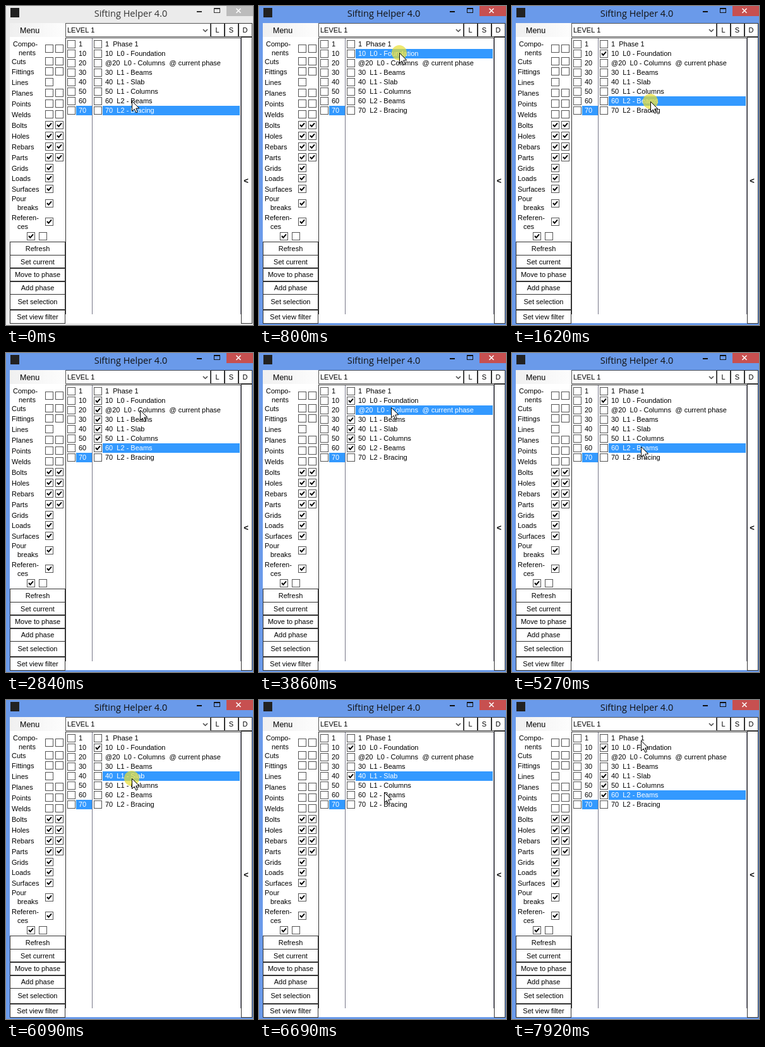
Write an HTML page with a canvas that moves like this. It is 391 px wide and 505 px high and loops after 8000 ms.

```html
<!DOCTYPE html>
<html lang="en">
<head>
<meta charset="utf-8">
<title>Sifting Helper 4.0</title>
<style>
html, body { margin: 0; width: 100%; height: 100%; overflow: hidden; background: #fff; }
canvas { display: block; }
</style>
</head>
<body>
<canvas id="stage" width="391" height="505"></canvas>
<script>
const ctx = document.getElementById('stage').getContext('2d');
const LOOP = 8000;
const UI = '11px "Liberation Sans", Arial, sans-serif';
const INK = '#000', LINE = '#333', SELECT = '#3399ff';

const phases = [
  ['1', '1  Phase 1'],
  ['10', '10  L0 - Foundation'],
  ['20', '@20  L0 - Columns', '@ current phase'],
  ['30', '30  L1 - Beams'],
  ['40', '40  L1 - Slab'],
  ['50', '50  L1 - Columns'],
  ['60', '60  L2 - Beams'],
  ['70', '70  L2 - Bracing']
];

// label, number of boxes, checked
const filters = [
  ['Cuts', 2, 0], ['Fittings', 2, 0], ['Lines', 1, 0], ['Planes', 2, 0],
  ['Points', 2, 0], ['Welds', 2, 0], ['Bolts', 2, 1], ['Holes', 2, 1],
  ['Rebars', 2, 1], ['Parts', 2, 1], ['Grids', 1, 1], ['Loads', 1, 1],
  ['Surfaces', 1, 1]
];

// label, top, height
const buttons = [
  ['Refresh', 373, 21], ['Set current', 394, 21], ['Move to phase', 414, 21],
  ['Add phase', 436, 20], ['Set selection', 456, 24], ['Set view filter', 481, 21]
];

// time, pointer x, pointer y, then any changes of state
const steps = [
  [0, 199, 150, { row: 7, on: '', active: false }],
  [200, 203, 133], [400, 211, 105], [600, 219, 80],
  [800, 222, 74, { row: 1, click: true, active: true }],
  [1000, 222, 74, { on: '1' }],
  [1200, 221, 112], [1400, 219, 158],
  [1620, 219, 151, { row: 6, click: true }],
  [1820, 219, 151, { on: '123456' }],
  [2440, 218, 138], [2640, 215, 112], [2840, 212, 90], [3040, 211, 77],
  [3660, 210, 89, { row: 2, click: true }],
  [3860, 209, 86, { on: '13456' }],
  [4250, 208, 118],
  [4450, 206, 144, { row: 6, click: true }],
  [4650, 205, 144, { on: '1' }],
  [5270, 204, 148], [5470, 204, 143], [5670, 202, 134], [5880, 200, 127],
  [6090, 199, 124, { row: 4, click: true }],
  [6280, 199, 124, { on: '14' }],
  [6500, 198, 146],
  [6700, 197, 157, { row: 6, click: true }],
  [6900, 197, 157, { on: '1456' }],
  [7500, 198, 145], [7700, 201, 104], [7920, 204, 64]
];

function stateAt(time) {
  const state = {};
  for (const [start, x, y, change] of steps) {
    if (start > time) break;
    Object.assign(state, { x, y, click: false }, change);
  }
  return state;
}

function fill(x, y, w, h, color) {
  ctx.fillStyle = color;
  ctx.fillRect(x, y, w, h);
}

function frame(x, y, w, h, color = LINE) {
  ctx.strokeStyle = color;
  ctx.lineWidth = 1;
  ctx.strokeRect(x + 0.5, y + 0.5, w - 1, h - 1);
}

function text(str, x, y, color = INK, font = UI, align = 'left') {
  ctx.font = font;
  ctx.textAlign = align;
  ctx.fillStyle = color;
  ctx.fillText(str, x, y);
}

function path(points, color, width) {
  ctx.beginPath();
  points.forEach(([x, y]) => ctx.lineTo(x, y));
  ctx.strokeStyle = color;
  ctx.lineWidth = width;
  ctx.stroke();
}

function checkbox(x, y, on) {
  fill(x, y, 13, 13, '#fff');
  frame(x, y, 13, 13, '#555');
  if (on) path([[x + 3, y + 6], [x + 5.4, y + 8.8], [x + 10, y + 3.4]], INK, 2);
}

function drawWindow(active) {
  fill(0, 0, 391, 505, active ? '#6a9aea' : '#ebebeb');
  fill(6, 27, 384, 475, '#fff');
  fill(7, 3, 14, 15, '#222');
  const ink = active ? '#111' : '#333';
  text('Sifting Helper 4.0', 197.5, 17, ink, '14.5px "Open Sans", "Noto Sans", sans-serif', 'center');
  fill(302, 8, 8, 2, ink);
  frame(329, 3, 10, 8, ink);
  fill(329, 3, 10, 2, ink);
  fill(349, 0, 42, 16, active ? '#c75050' : '#bcbcbc');
  path([[364.5, 4], [371.5, 11]], '#fff', 1.6);
  path([[371.5, 4], [364.5, 11]], '#fff', 1.6);
}

function drawToolbar() {
  const shade = ctx.createLinearGradient(6, 0, 94, 0);
  shade.addColorStop(0, '#f0f0f0');
  shade.addColorStop(1, '#fdfdfd');
  fill(6, 27, 88, 22, shade);
  text('Menu', 22, 43, INK, '12.5px "Liberation Sans", Arial, sans-serif');
  frame(94, 27, 230, 22, '#555');
  text('LEVEL 1', 97, 42);
  path([[312, 37], [315.5, 40.5], [319, 37]], '#444', 1.5);
  ['L', 'S', 'D'].forEach((name, i) => {
    frame(324 + 22 * i, 27, 22, 22);
    text(name, 334.5 + 22 * i, 42, INK, UI, 'center');
  });
}

function drawFilters() {
  text('Compo-', 11, 64);
  text('nents', 20, 78);
  checkbox(62, 61, false);
  checkbox(78, 61, false);
  filters.forEach(([name, count, on], i) => {
    const y = Math.floor(88 + 16.9 * i);
    text(name, 9, y + 4);
    for (let k = 0; k < count; k++) checkbox(62 + 16 * k, y - 7, on);
  });
  text('Pour', 9, 309);
  text('breaks', 18, 323);
  checkbox(62, 306, true);
  text('Referen-', 9, 339);
  text('ces', 18, 353);
  checkbox(62, 335, true);
  checkbox(33, 358, true);
  checkbox(52, 358, false);
  for (const [name, y, h] of buttons) {
    frame(6, y, 88, h + 1);
    text(name, 50, Math.round(y + h / 2 + 4), INK, UI, 'center');
  }
}

function drawLists(row, on) {
  fill(94, 50, 278, 1, LINE);
  fill(94, 50, 1, 438, LINE);
  fill(136, 51, 1, 437, '#778');
  fill(371, 51, 1, 437, '#778');
  frame(372, 49, 18, 454);
  text('<', 380, 281, INK, 'bold 13px "Liberation Sans", Arial, sans-serif', 'center');
  phases.forEach(([id, name, note], i) => {
    const top = 53 + 15 * i, base = top + 11;
    if (i === 7) fill(111, top, 25, 15, SELECT);
    if (i === row) fill(153, top, 217, 15, SELECT);
    checkbox(97, top + 1, false);
    checkbox(139, top + 1, on.includes(i));
    const ink = i === row ? '#fff' : INK;
    text(id, 115, base, i === 7 ? '#fff' : INK);
    text(name, 157, base, ink);
    if (note) text(note, 258.5, base, ink);
  });
}

function drawPointer({ x, y, click }) {
  if (click) {
    ctx.beginPath();
    ctx.arc(x, y, 12, 0, 2 * Math.PI);
    ctx.fillStyle = 'rgba(232, 222, 50, 0.7)';
    ctx.fill();
  }
  const arrow = [[0, 0], [0, 16], [3.7, 12.6], [6.4, 18.4], [8.8, 17.3], [6.2, 11.6], [11.3, 11.3]];
  ctx.beginPath();
  arrow.forEach(([dx, dy]) => ctx.lineTo(x + 0.5 + dx, y + 0.5 + dy));
  ctx.closePath();
  ctx.fillStyle = '#fff';
  ctx.fill();
  ctx.strokeStyle = INK;
  ctx.lineWidth = 1;
  ctx.stroke();
}

function draw(now) {
  const state = stateAt(now % LOOP);
  drawWindow(state.active);
  drawToolbar();
  drawFilters();
  drawLists(state.row, state.on);
  drawPointer(state);
}

const start = performance.now();
function tick() {
  draw(performance.now() - start);
  requestAnimationFrame(tick);
}
tick();
</script>
</body>
</html>
```
